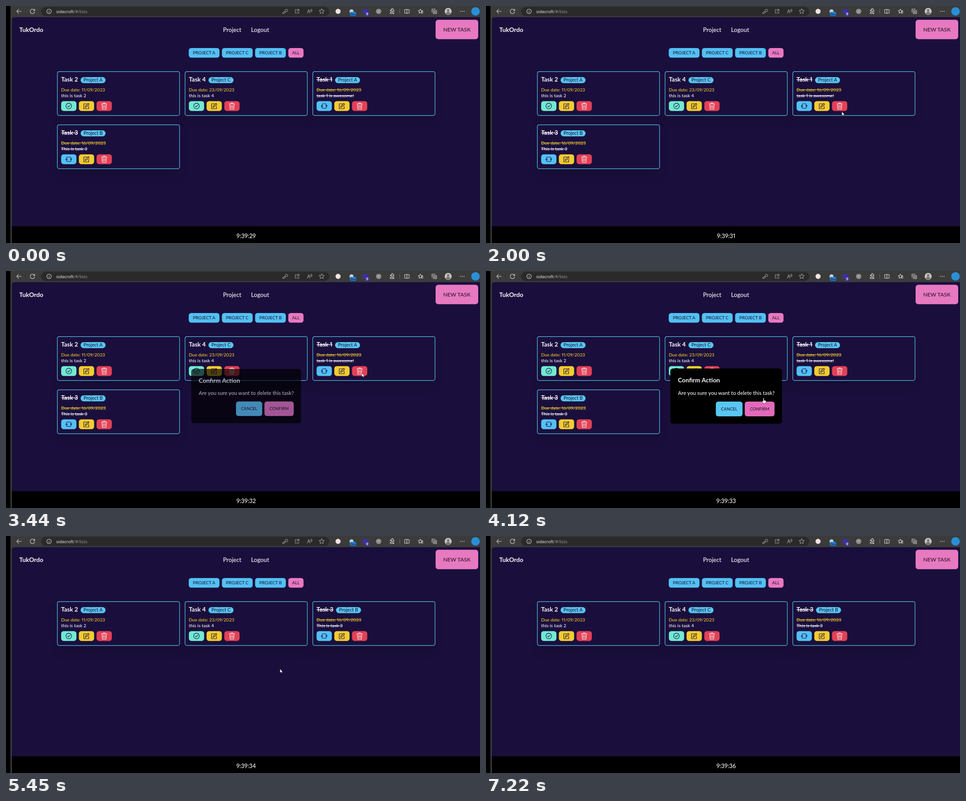
An HTML page for the animation above (7.83 s loop, 1057x530 px).

```html
<!DOCTYPE html>
<html lang="en">
<head>
<meta charset="utf-8">
<title>Task list</title>
<style>
html, body { margin: 0; width: 100%; height: 100%; overflow: hidden; background: #000; }
svg { display: block; width: 1057px; height: 530px; }
text { font-family: Lato, "Open Sans", sans-serif; font-weight: 500; font-variant-numeric: proportional-nums; fill: #f9f7fd; white-space: pre; }
.bold { font-weight: 700; }
.mid { text-anchor: middle; }
.dark { fill: #1c1738; }
.wine { fill: #2e1827; }
.done { text-decoration: line-through; }
.url { font-family: "Open Sans", "Noto Sans", sans-serif; font-weight: 400; }
.ico, .bar { fill: none; stroke: #201047; stroke-width: 1.15; stroke-linecap: round; stroke-linejoin: round; }
.bar { stroke: #dedede; stroke-width: 1.1; }
.dim { stroke: #9a9a9a; }
.frame { fill: #1a0f3c; stroke: #58c7f3; stroke-width: 1.2; filter: drop-shadow(0 13px 9px rgba(0, 0, 0, .13)); }
.pointer { fill: #fff; stroke: #111; stroke-width: .6; }
</style>
</head>
<body>
<svg id="stage" viewBox="0 0 1057 530"></svg>
<script>
const LOOP = 7830, STEP = 67;
const PINK = '#e779c1', BLUE = '#58c7f3', INFO = '#53c0f3';
const YELLOW = '#f3cc30', MINT = '#71ead2', RED = '#e24056';

const box = (x, y, w, h, fill, r = 0, more = '') =>
  `<rect x="${x}" y="${y}" width="${w}" height="${h}" rx="${r}" fill="${fill}" ${more}/>`;
const text = (x, y, size, str, cls = '', more = '') =>
  `<text x="${x}" y="${y}" font-size="${size}" class="${cls}" ${more}>${str}</text>`;
const disc = (x, y, r, fill, more = '') => `<circle cx="${x}" cy="${y}" r="${r}" fill="${fill}" ${more}/>`;
const line = (d, cls = 'bar', more = '') => `<path d="${d}" class="${cls}" ${more}/>`;
const place = (x, y, s = 1) => `translate(${x} ${y}) scale(${s})`;
const group = (x, y, inner, id = '') => `<g id="${id}" transform="${place(x, y)}">${inner}</g>`;
const ring = r => `M${-r} 0a${r} ${r} 0 1 0 ${2 * r} 0a${r} ${r} 0 1 0 ${-2 * r} 0`;
const star = r => 'M' + Array.from({ length: 10 }, (_, i) => {
  const a = i * Math.PI / 5, q = i % 2 ? r * .48 : r;
  return `${(q * Math.sin(a)).toFixed(2)} ${(-q * Math.cos(a)).toFixed(2)}`;
}).join('L') + 'Z';

// Width of a piece of text as the browser sets it
function measure(size, str, cls) {
  stage.innerHTML = text(0, 0, size, str, cls);
  return stage.firstChild.getComputedTextLength();
}

const half = 'M-5-1V-2a3 3 0 0 1 3-3H2a3 3 0 0 1 3 3V1M3-1L5 1L7-1';
const icons = {
  check: line(ring(6.3) + 'M-2.6 .3L-.8 2.1L2.8-2', 'ico'),
  edit: line('M1-5H-6V6H5V0M-3 3l1-3L4-6l2 2L0 2z', 'ico'),
  trash: line('M-6-5H6M-2-5V-7H2V-5M-5-5L-4 7H4L5-5M-1.6-2V4M1.6-2V4', 'ico', 'style="stroke:#f9f7fd"'),
  redo: line(half, 'ico') + line(half, 'ico', 'transform="rotate(180)"')
};

const slot = i => [114 + 284.8 * (i % 3), 146 + 119 * Math.floor(i / 3)];

const tasks = [
  { n: 2, proj: 'A', date: '11/09/2023', note: 'this is task 2' },
  { n: 4, proj: 'C', date: '23/09/2023', note: 'this is task 4' },
  { n: 1, proj: 'A', date: '16/09/2023', note: 'task 1 is awesome!', done: true },
  { n: 3, proj: 'B', date: '16/09/2023', note: 'This is task 3', done: true }
];

function card({ n, proj, date, note, done }, i) {
  const cut = done ? 'done' : '', title = 'Task ' + n, tag = 'Project ' + proj;
  const gap = 15 + measure(13.4, title, 'bold'), w = 13 + measure(10.6, tag);
  const kinds = [done ? ['redo', INFO] : ['check', MINT], ['edit', YELLOW], ['trash', RED]];
  return group(...slot(i),
    box(.5, .6, 272.6, 98.2, '', 4, 'class="frame"') +
    text(9, 23, 13.4, title, 'bold ' + cut) +
    box(gap, 13, w, 13.6, BLUE, 6.8) +
    text(gap + w / 2, 23.2, 10.6, tag, 'mid dark') +
    text(9, 44.5, 10, 'Due date: ' + date, cut, `style="fill:${YELLOW}"`) +
    text(9, 58, 10.3, note, cut) +
    kinds.map(([icon, fill], k) =>
      group(26 + 39.5 * k, 77.7, box(-17, -11, 34, 22, fill, 5.5) + icons[icon], icon + n)).join(''),
    'task' + n);
}

function browser() {
  const tools = [
    [29, 'M5 0H-5M-1-4.5L-5 0L-1 4.5'],
    [59, 'M4-3A5 5 0 1 0 5 .5M5-5V-2H2'],
    [96, ring(5) + 'M0 0V2.5M0-2.4V-2.3'],
    [622, 'M1-1a2.7 2.7 0 1 1 1.5 1.5L-3 5H-5V3L1-1', 'dim'],
    [649, 'M0-4H-4V4H4V1M1-4.5H4.5V-1M4-4L0 0', 'dim'],
    [677, 'M-5 4L-2-4L1 4M-4 1H0M2-4q2 2 0 4M4-5q3 3 0 6', 'dim'],
    [704, star(6), 'dim'],
    [831, ring(5) + ring(2.6) + ring(.6)],
    [861, 'M-4-3H-1a2 2 0 1 1 3 0H4V0a2 2 0 1 0 0 3V5H-4V2a2 2 0 1 0 0-3Z'],
    [894, 'M-1-4H-5V4H-1M1-4H5V4H1M0-5V5'],
    [924, star(5) + 'M3-1H6M3 1.5H6M4 4H6'],
    [955, 'M-2-2H5V5H-2ZM-5 2V-5H2M1.5 0V3M0 1.5H3']
  ];
  return box(10, 0, 1047, 530, '#3b3b3b') + box(78, 1.5, 643, 21, '#2a2a2a', 10.5) +
    tools.map(([x, d, tone = '']) => group(x, 12, line(d, 'bar ' + tone))).join('') +
    text(112, 15.5, 9.6, 'sidecroft<tspan fill="#9d9d9d">/#/lists</tspan>', 'url') +
    disc(740.5, 12, 5.7, '#f0e4e4') +
    disc(770.5, 12, 4.5, '#c9d3dc') + box(767.5, 13, 13, 9, '#2087e0', 2) +
    text(774, 20.6, 8, '6m', 'mid dark') +
    box(796, 7, 10, 10, '#3a2fae', 1) + box(801, 13, 9, 9, '#43389f', 2) +
    text(805.5, 20.8, 8, '9', 'mid bold') +
    box(877.5, 7, 1, 10, '#707070') +
    disc(986, 12, 7.8, '#c9c5c2') + disc(986, 9.8, 2.7, '#77716e') +
    '<path d="M981 17a5 4 0 0 1 10 0a7 7 0 0 1-10 0Z" fill="#77716e"/>' +
    [-4, 0, 4].map(d => disc(1017.5 + d, 12, .9, '#dedede')).join('') +
    disc(1047, 12, 9.5, '#2a8fd8');
}

function page() {
  const filters = ['PROJECT A', 'PROJECT C', 'PROJECT B', 'ALL'].map((s, i) => {
    const all = s === 'ALL', w = all ? 34 : 68.5, x = 407.5 + 74 * i;
    return box(x, 94, w, 21.6, all ? PINK : INFO, 5.5) +
      text(x + w / 2, 108.2, 9.8, s, 'mid ' + (all ? 'wine' : 'dark'));
  });
  return '<path d="M13 530V31q0-6 6-6H1057V530Z" fill="#1a0f3c"/>' +
    text(29.5, 58, 13.8, 'TukOrdo', 'bold') +
    text(484, 58, 13, 'Project') + text(546.5, 58, 13.2, 'Logout') +
    box(958, 30.7, 95, 43.6, PINK, 6) + text(1005.5, 57, 12.2, 'NEW TASK', 'mid wine') +
    filters.join('') + tasks.map(card).join('') +
    box(13, 492.5, 1044, 37.5, '#000') + text(535.5, 518.5, 13, '', 'mid', 'id="clock"');
}

const dialog = '<g id="dialog">' + box(411, 218, 249, 123.5, '#000', 6) +
  text(428, 249.2, 13.9, 'Confirm Action', 'bold') +
  text(428, 277, 11.75, 'Are you sure you want to delete this task?') +
  box(512.5, 292, 59.5, 33, BLUE, 5.5) + text(542.2, 311.8, 9.4, 'CANCEL', 'mid dark') +
  group(610.2, 308.5, box(-33.2, -16.5, 66.4, 33, PINK, 5.5, 'id="fill"') +
    text(0, 3.3, 9.4, 'CONFIRM', 'mid wine'), 'confirm') + '</g>';

const pointer = group(0, 0, disc(0, 0, 8, '#f0b000', 'id="spot" opacity=".75"') +
  line('M0 0V9L2 7L4 10L5 9L4 7H6Z', 'pointer', 'id="arrow"') +
  line('M-1 1a1 1 0 0 1 2 0V5L5 6Q6 6 5 10L4 12H0L-4 8Q-4 6-1 8Z', 'pointer', 'id="hand"'), 'cursor');

stage.innerHTML = browser() + page() + dialog + pointer;

// Pointer strokes: begin, end, and where it comes to rest
const origin = [954, 517];
const moves = [
  [730, 1490, 788, 326], [1490, 2000, 793.5, 236], [2880, 3020, 793.5, 228],
  [3440, 3960, 616, 325], [3960, 4110, 619, 284], [4110, 4310, 493, 216], [4310, 4450, 630, 282],
  [4520, 5000, 611, 297], [5660, 6000, 618, 314], [6150, 6350, 713, 404], [6540, 7220, 1045, 508]
];

const within = (t, a, b) => t >= a && t < b;
const ramp = (t, a, b) => Math.min(1, Math.max(0, (t - a) / (b - a)));

// The screen refreshes every STEP, counted from the start of each stroke
function pointerAt(t) {
  let [x, y] = origin;
  for (const [a, b, toX, toY] of moves) {
    const u = t < b ? ramp(Math.floor((t - a) / STEP) * STEP, 0, b - a) : 1;
    x += (toX - x) * u;
    y += (toY - y) * u;
  }
  return [x, y];
}

const set = (id, name, value) => document.getElementById(id).setAttribute(name, value);
const show = (id, on) => set(id, 'visibility', on ? 'visible' : 'hidden');

function draw(t) {
  const hand = within(t, 4080, 4180) || within(t, 4450, 5450);
  const inside = within(t, 730, 7220);
  const confirming = within(t, 5180, 5450);
  set('cursor', 'transform', place(...pointerAt(t)));
  show('arrow', inside && !hand);
  show('hand', hand);
  show('spot', within(t, 2330, 2610) || confirming);

  document.getElementById('clock').textContent = '9:39:' + (29 + Math.floor((t + 70) / 1000));

  const removed = t >= 5330;
  show('task1', !removed);
  set('task3', 'transform', place(...slot(removed ? 2 : 3)));
  set('trash1', 'transform', place(105, 77.7, within(t, 3225, 3370) ? .96 : 1));

  const open = ramp(t, 3300, 3510) - ramp(t, 5260, 5450), s = .95 + .05 * open;
  set('dialog', 'opacity', open);
  set('dialog', 'transform', place(535.5 * (1 - s), 280 * (1 - s), s));
  const hover = hand ? ramp(t, 3900, 4450) : 0;
  set('fill', 'fill', `rgb(${231 - 7 * hover},${121 - 39 * hover},${193 - 15 * hover})`);
  set('confirm', 'transform', place(610.2, 308.5, confirming ? .965 : 1));
}

const start = performance.now();
function tick() {
  draw((performance.now() - start) % LOOP);
  requestAnimationFrame(tick);
}
tick();
</script>
</body>
</html>
```
